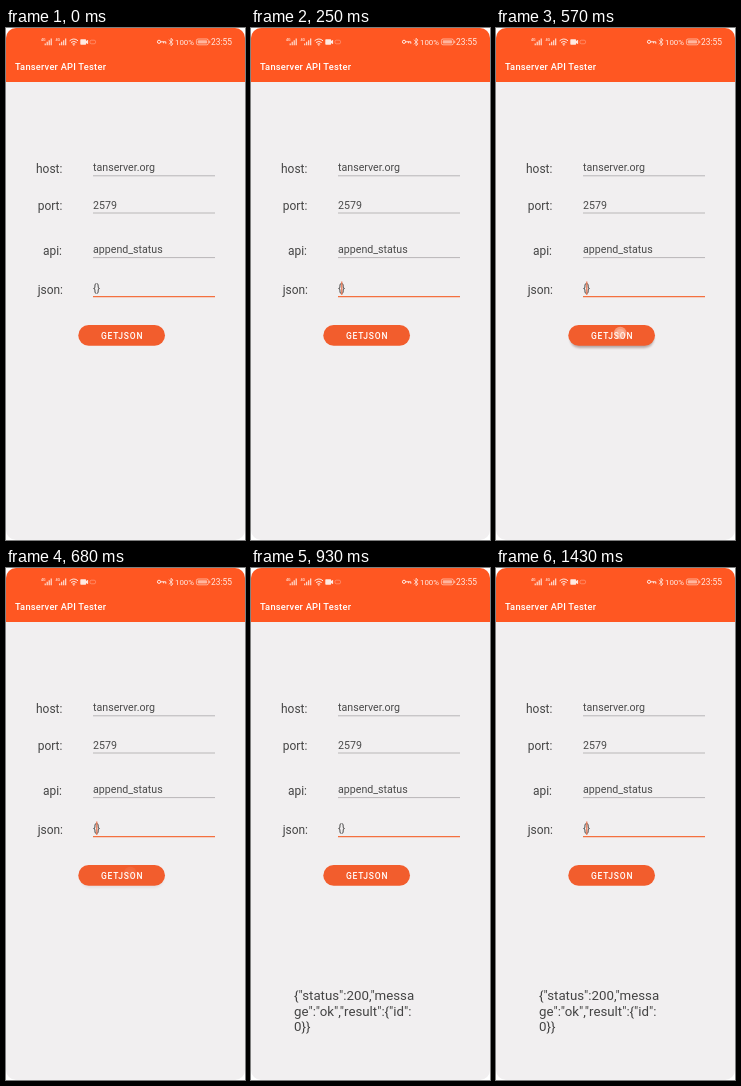
An HTML page for the animation above (1460 ms loop, 239 px wide and 512 px high).

```html
<!DOCTYPE html>
<html lang="en">
<head>
<meta charset="utf-8">
<title>API Tester</title>
<style>
  html, body { margin: 0; width: 100%; height: 100%; overflow: hidden; background: #fff; }
  svg { display: block; width: 100%; height: 100%; font-family: Roboto, sans-serif; }
  .label { font-size: 11.95px; fill: #444; }
  .value { font-size: 10.65px; fill: #4a4a4a; }
  .reply { font-size: 13.28px; fill: #444; }
  .title { font-size: 9.3px; font-weight: 500; letter-spacing: .23px; fill: #fff; }
  .action { font-size: 8.5px; font-weight: 500; letter-spacing: .8px; fill: #fff; }
  .status { fill: #ffe9e1; }
  .line { fill: none; stroke: #ffe9e1; }
</style>
</head>
<body>
<svg viewBox="0 0 239 512">
  <defs>
    <clipPath id="screen"><rect width="239" height="512" rx="10"/></clipPath>
    <filter id="soft" x="-20%" y="-50%" width="140%" height="200%"><feGaussianBlur stdDeviation="1.3"/></filter>
    <g id="signal">
      <text y="12.6" font-size="3.7" font-weight="500">4G</text>
      <path d="M4.2 17.2v-1.8M6.2 17.2v-3.4M8.2 17.2v-5M10.2 17.2v-6.6" stroke="#ffe9e1" stroke-width="1.1"/>
    </g>
  </defs>
  <g clip-path="url(#screen)">
    <rect width="239" height="512" fill="#f1eff0"/>
    <rect width="239" height="54" fill="#ff5722"/>

    <g class="status">
      <use href="#signal" x="35"/>
      <use href="#signal" x="49.5"/>
      <g class="line">
        <path d="M63.6 12.8q4.2-3.6 8.4 0M65 14.5q2.8-2.3 5.6 0M66.4 16.1q1.4-1 2.8 0"/>
        <circle cx="153" cy="13.8" r="1.6"/>
        <path d="M154.7 13.8h5.1v1.9M157.6 13.8v1.5"/>
        <path d="M163 11.7l4 4.2-2 1.8v-7.4l2 1.8-4 4.2" stroke-width=".8"/>
        <rect x="190.4" y="11" width="12" height="5.8" rx="1.6" stroke-width=".8" opacity=".75"/>
        <rect x="84" y="12.2" width="5.6" height="3.6" rx="1.5" stroke-width=".7" opacity=".45"/>
      </g>
      <circle cx="67.8" cy="17" r=".7"/>
      <path d="M75 11.3h4.4q.7 0 .7.7v1l2-1.2v4.4l-2-1.2v1q0 .7-.7.7H75q-.7 0-.7-.7v-4q0-.7.7-.7z"/>
      <rect x="191.7" y="12.3" width="9.4" height="3.2" rx=".8" opacity=".65"/>
      <rect x="203.2" y="12.7" width="1" height="2.4" opacity=".75"/>
      <text x="169" y="16.9" font-size="7.9">100%</text>
      <text x="205" y="17" font-size="8.4">23:55</text>
    </g>
    <text class="title" x="9" y="42">Tanserver API Tester</text>

    <g id="form"></g>
    <path id="cursor" d="M90.8 253.5v13.5" stroke="#e9693f" stroke-width="1.1"/>

    <rect id="shadow" x="74" y="301" width="84" height="19" rx="9.5" fill="#4d2a20" filter="url(#soft)"/>
    <rect x="72.3" y="297" width="86.7" height="20.8" rx="10.4" fill="#f25d2d"/>
    <text class="action" x="95" y="310.5">GETJSON</text>
    <g id="touch" fill="#ffe4d8">
      <circle cx="124.3" cy="305" r="6.2" opacity=".45"/>
      <circle cx="124.3" cy="305" r="4" opacity=".25"/>
    </g>

    <g id="reply" class="reply">
      <text x="43" y="432">{"status":200,"messa</text>
      <text x="43" y="447.6">ge":"ok","result":{"id":</text>
      <text x="43" y="463.2">0}}</text>
    </g>
  </g>
</svg>
<script>
  const LOOP = 1460;
  const part = id => document.getElementById(id);

  // label, label x, label baseline, value, underline y
  const fields = [
    ["host:", 30, 145, "tanserver.org", 147.8],
    ["port:", 31.7, 182.3, "2579", 185],
    ["api:", 37, 227, "append_status", 229.6],
    ["json:", 31.7, 265.5, "{}", 268.6]
  ];
  part("form").innerHTML = fields.map(([label, x, y, value, base], i) => {
    const focused = i === 3;
    return `<text class="label" x="${x}" y="${y}">${label}</text>
      <text class="value" x="87" y="${base - 4.5}">${value}</text>
      <path d="M87 ${base}H209" stroke="${focused ? "#f4703f" : "#aaa8a9"}" stroke-width="${focused ? 1.4 : .8}"/>`;
  }).join("");

  const between = (t, from, to) => t >= from && t < to;
  const fade = (t, from, to, ramp) =>
    Math.max(0, Math.min(1, (t - from) / ramp, (to - t) / ramp));

  function draw(now) {
    const t = now % LOOP;
    const cursorOn = between(t, 215, 895) || t >= 1235;
    const press = fade(t, 500, 690, 50);
    part("cursor").setAttribute("opacity", cursorOn ? 1 : 0);
    part("touch").setAttribute("opacity", press);
    part("shadow").setAttribute("opacity", press * .35);
    part("reply").setAttribute("opacity", t >= 700 ? 1 : 0);
    requestAnimationFrame(draw);
  }
  draw(0);
</script>
</body>
</html>
```
